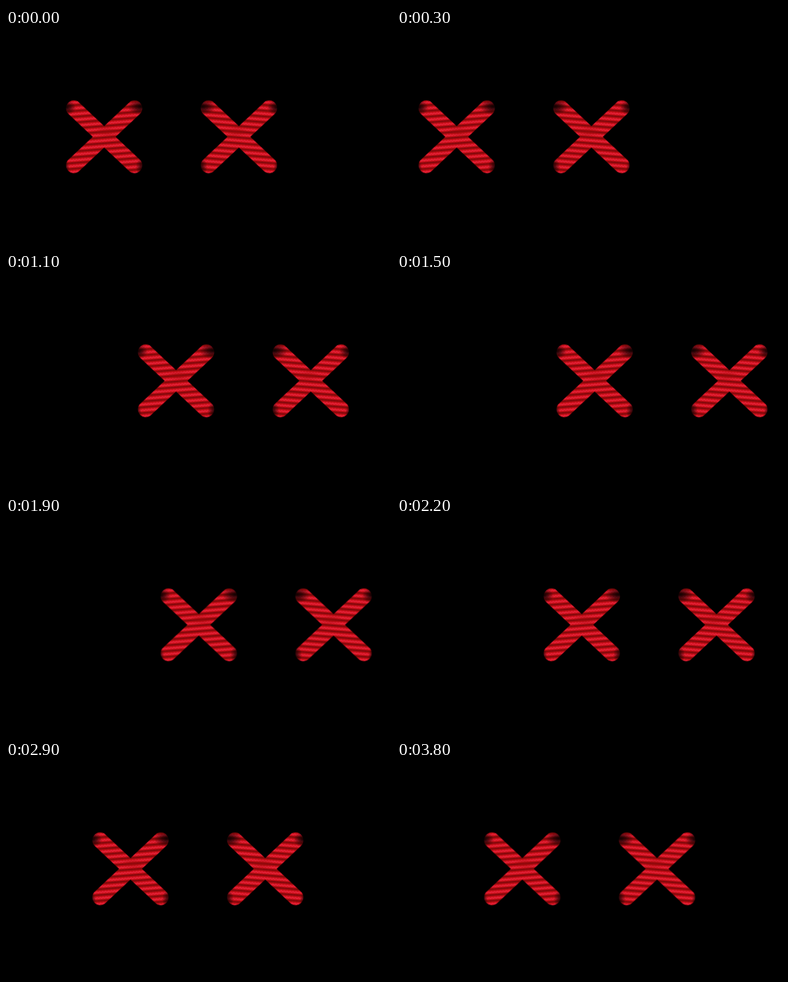
An HTML page for the animation above (4 s loop, 600 px wide and 338 px high).

```html
<!DOCTYPE html>
<html lang="en">
<head>
<meta charset="utf-8">
<title>Red eyes</title>
<style>
  html, body { margin: 0; width: 100%; height: 100%; overflow: hidden; background: #000; }
  svg { display: block; width: 600px; height: 338px; }
</style>
</head>
<body>
<svg viewBox="0 0 600 338">
  <defs>
    <linearGradient id="band" x2="0" y2="1">
      <stop offset="0" stop-color="#6a0707"/>
      <stop offset=".2" stop-color="#a80b10"/>
      <stop offset=".42" stop-color="#d8101e"/>
      <stop offset=".72" stop-color="#d00f1b"/>
      <stop offset=".88" stop-color="#980a0e"/>
      <stop offset="1" stop-color="#6a0707"/>
    </linearGradient>
    <pattern id="mesh" width="4.6" height="9" patternUnits="userSpaceOnUse" patternTransform="translate(0 1) rotate(-4.5)">
      <rect width="4.6" height="9" fill="url(#band)"/>
      <path d="M0 3.8L2.3 5.8L4.6 3.8" fill="none" stroke="#ff3c60" stroke-width="1" opacity=".75"/>
      <path d="M0 7.6L2.3 6.4L4.6 7.6M0 1.6L2.3 2.8L4.6 1.6" fill="none" stroke="#c81016" stroke-width=".9" opacity=".7"/>
    </pattern>
    <radialGradient id="shade">
      <stop offset="0" stop-color="#000" stop-opacity=".9"/>
      <stop offset=".4" stop-color="#000" stop-opacity=".6"/>
      <stop offset="1" stop-color="#000" stop-opacity="0"/>
    </radialGradient>
    <radialGradient id="core">
      <stop offset="0" stop-color="#980a0a" stop-opacity=".65"/>
      <stop offset="1" stop-color="#980a0a" stop-opacity="0"/>
    </radialGradient>
    <filter id="soft" x="-70" y="-70" width="140" height="140" filterUnits="userSpaceOnUse">
      <feGaussianBlur stdDeviation=".4"/>
    </filter>
    <g id="eye">
      <path d="M-47.3-44.7L47.3 44.7M47.3-44.7L-47.3 44.7" fill="none" stroke="url(#mesh)"
        stroke-width="24.4" stroke-linecap="round" filter="url(#soft)"/>
      <ellipse cx="4" cy="-8" rx="19" ry="7" fill="url(#core)"/>
      <g fill="url(#shade)">
        <ellipse cx="-59" cy="-46" rx="15" ry="12"/>
        <ellipse cx="57" cy="-47" rx="21" ry="13"/>
        <ellipse cx="61" cy="47" rx="12" ry="16"/>
        <ellipse cx="-62" cy="49" rx="8" ry="13"/>
      </g>
    </g>
  </defs>
  <rect width="600" height="338"/>
  <g id="eyes">
    <use href="#eye"/>
    <use href="#eye" transform="translate(210 0) scale(-1 1)"/>
  </g>
</svg>
<script>
  const LOOP = 4000, STEP = 100;

  // time, left eye centre, easing to the next pose
  const poses = [
    [0, 153, 'cubic-bezier(.2,.5,.4,1)'],
    [300, 93, 'ease-in-out'],
    [700, 101, 'cubic-bezier(.4,0,.55,.83)'],
    [1100, 265, 'cubic-bezier(.39,.575,.565,1)'],
    [1500, 308, 'ease-in-out'],
    [1900, 300.5, 'linear'],
    [2080, 300, 'cubic-bezier(.5,0,.3,1)'],
    [2600, 187, 'ease-in-out'],
    [3000, 195, 'linear'],
    [3800, 195.3, 'linear'],
    [LOOP, 195.3, 'linear']
  ];

  const glance = document.getElementById('eyes').animate(
    poses.map(([t, x, easing]) => ({
      offset: t / LOOP,
      transform: `translate(${x}px, 170.3px)`,
      easing
    })),
    { duration: LOOP, fill: 'both' }
  );
  glance.pause();

  function draw() {
    const t = performance.now() % LOOP;
    glance.currentTime = Math.floor(t / STEP) * STEP;
    requestAnimationFrame(draw);
  }
  draw();
</script>
</body>
</html>
```
